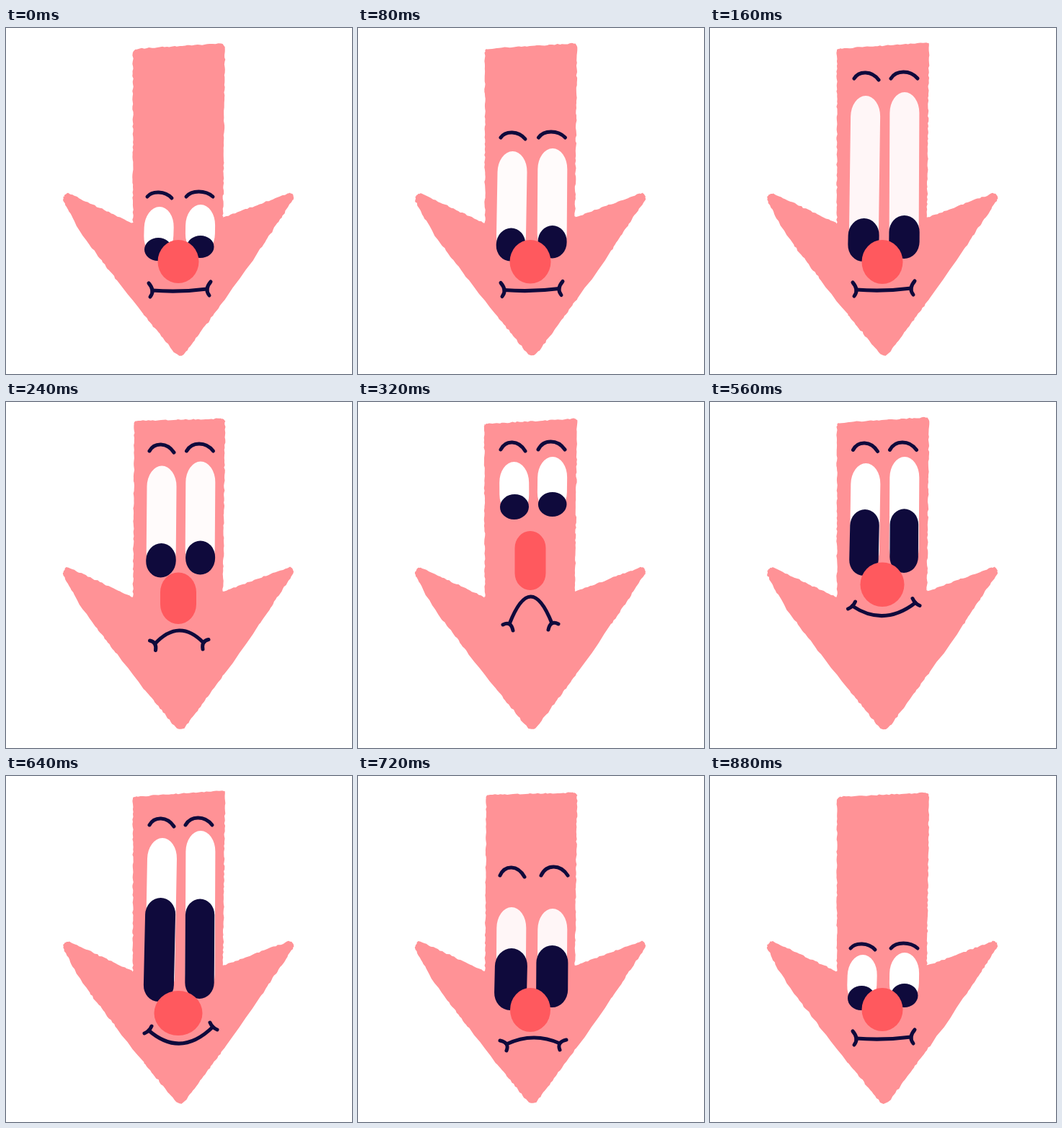
Animation of 480 by 480 pixels, one loop 960 ms. Source, as an HTML page with a canvas:

```html
<!DOCTYPE html>
<html lang="en">
<head>
<meta charset="utf-8">
<title>Arrow face</title>
<style>
  html, body { margin: 0; width: 100%; height: 100%; overflow: hidden; background: #fff; }
  canvas { display: block; width: 480px; height: 480px; }
</style>
</head>
<body>
<canvas id="stage" width="480" height="480"></canvas>
<script>
const ctx = document.getElementById('stage').getContext('2d');
const STEP = 80, STEPS = 12;
const PINK = '#ff9296', RED = '#ff595e', NAVY = '#0f0a3c';

// Both halves of a mouth-corner tick, relative to the left corner
const FLAT = [-5, -10, -3, 9], FROWN = [-9, 1, 5, 9], SMILE = [-6, 4, 4, -6], SAD = [-9, -5, 0, 9];

// brow: leftX, rightX, y, rise | eye: leftX, leftTop, rightTop, tint
// pupil: leftX, width, top, height, rightTop | nose: width, top, height
// mouth: leftX, leftY, middleY, rightX, rightY
const rest = {
  at: 0, brow: [196, 250, 235, 7], eye: [213, 248, 245, 0], pupil: [211, 38, 291, 32, 288],
  nose: [57, 294, 60], mouth: [203, 364, 365, 279, 362], tick: FLAT
};
const poses = [
  rest,
  { at: 2, brow: [200, 251, 71, 9], eye: [216, 94, 89, 9], pupil: [213, 43, 264, 60, 260],
    nose: [57, 294, 61], mouth: [203, 363, 364, 279, 361], tick: FLAT },
  { at: 4, brow: [198, 250, 67, 11], eye: [216.5, 83, 76, 0], pupil: [217, 40, 128, 35, 125],
    nose: [43, 179, 82], mouth: [210, 308, 270, 269, 307], tick: FROWN },
  { at: 6, brow: [198, 250, 66, 11], eye: [215.5, 84, 76, 0], pupil: [215, 39, 129, 40, 126],
    nose: [55, 147, 61], mouth: [197, 213, 222, 283, 209], tick: SMILE },
  { at: 8, brow: [199, 249, 69, 10], eye: [217, 86, 76, 0], pupil: [213, 42, 169, 144, 170.5],
    nose: [67, 298, 62], mouth: [198, 353, 371, 287, 348], tick: SMILE },
  { at: 9, brow: [197, 254, 139, 12], eye: [213, 182, 184, 9], pupil: [212, 45, 239, 86, 235],
    nose: [56, 294, 61], mouth: [206, 372, 363, 280, 371], tick: SAD },
  { ...rest, at: 11, brow: [195, 251, 240, 7], eye: [212, 248, 245, 0], pupil: [210, 38, 291, 34, 288] }
];

function poseAt(step) {
  const i = poses.findLastIndex(p => p.at <= step);
  const a = poses[i], b = poses[i + 1] || rest;
  const k = (step - a.at) / ((b.at || STEPS) - a.at);
  const mix = name => a[name].map((v, j) => v + (b[name][j] - v) * k);
  return Object.fromEntries(['brow', 'eye', 'pupil', 'nose', 'mouth', 'tick'].map(n => [n, mix(n)]));
}

function seeded(seed) {
  return () => {
    seed = (seed * 16807) % 2147483647;
    return seed / 2147483647 - 0.5;
  };
}

// Arrow outline with rounded corners and a hand-drawn, boiling edge
function drawArrow(boil) {
  const random = seeded(9173 + boil * 7919);
  const shift = [0, 0, 0, 2, -1, 0][boil];
  const topRight = [21, 21, 20, 23, 23, 23][boil];
  const cut = [9, 6, 4, 5, 4, 6][boil];
  const corners = [
    [176 + shift, 29 - shift * 1.3, cut], [304, topRight, cut], [301, 263, 1],
    [396, 228, 4], [400, 236, 4], [329, 342, 40], [242, 460, 14],
    [172, 374, 30], [104, 285, 20], [78, 237, 5], [84, 228, 5], [176, 271, 1]
  ];
  const toward = (p, q, d) => {
    const k = d / Math.hypot(q[0] - p[0], q[1] - p[1]);
    return [p[0] + (q[0] - p[0]) * k, p[1] + (q[1] - p[1]) * k];
  };
  const dot = (x, y) => ctx.lineTo(x + random() * 1.5, y + random() * 1.5);
  ctx.beginPath();
  corners.forEach((p, i) => {
    const n = corners.length, prev = corners[(i + n - 1) % n], next = corners[(i + 1) % n];
    const a = toward(p, prev, p[2]), b = toward(p, next, p[2]), c = toward(next, p, next[2]);
    for (let t = 0; t < 1; t += 0.2) {
      const u = 1 - t;
      dot(u * u * a[0] + 2 * u * t * p[0] + t * t * b[0], u * u * a[1] + 2 * u * t * p[1] + t * t * b[1]);
    }
    const length = Math.hypot(c[0] - b[0], c[1] - b[1]);
    for (let d = 0; d < length; d += 3.5) dot(...toward(b, c, d));
  });
  ctx.closePath();
  ctx.fillStyle = PINK;
  ctx.fill();
}

// Upright pill whose centre line may lean from topX to bottomX
function pill(topX, top, bottomX, bottom, width, color, roundness = 0.55) {
  const h = bottom - top;
  const radius = { x: width / 2, y: Math.min(h / 2, width * roundness) };
  ctx.save();
  ctx.transform(1, 0, (bottomX - topX) / h, 1, topX, top);
  ctx.beginPath();
  ctx.roundRect(-width / 2, 0, width, h, radius);
  ctx.fillStyle = color;
  ctx.fill();
  ctx.restore();
}

// Stroke that passes through the middle point
function arc(x1, y1, mx, my, x2, y2) {
  ctx.beginPath();
  ctx.moveTo(x1, y1);
  ctx.quadraticCurveTo(2 * mx - (x1 + x2) / 2, 2 * my - (y1 + y2) / 2, x2, y2);
  ctx.stroke();
}

// Full-shouldered arch
function arch(x, y1, y2, width, rise) {
  const top = (y1 + y2) / 2 - rise * 4 / 3;
  ctx.beginPath();
  ctx.moveTo(x, y1);
  ctx.bezierCurveTo(x + width * 0.2, top, x + width * 0.72, top, x + width, y2);
  ctx.stroke();
}

function drawFace({ brow, eye, pupil, nose, mouth, tick }) {
  const [leftBrow, rightBrow, browY, rise] = brow;
  const [eyeX, leftTop, rightTop, tint] = eye;
  const [pupilX, width, top, height, pupilRightTop] = pupil;
  const white = `rgb(255 ${255 - tint} ${255 - tint * 0.9})`;
  const bottom = top + height, lean = height / 90;

  pill(eyeX, leftTop, pupilX, bottom - 6, 41, white, 0.7);
  pill(270, rightTop, 269, bottom - 9, 41, white, 0.7);
  pill(pupilX + lean, top, pupilX - lean, bottom, width, NAVY);
  pill(270 - lean / 2, pupilRightTop, 270 - lean, bottom - 4, width - lean, NAVY);
  pill(239, nose[1], 239, nose[1] + nose[2], nose[0], RED);

  ctx.strokeStyle = NAVY;
  ctx.lineWidth = 5;
  ctx.lineCap = 'round';
  arch(leftBrow, browY - 1, browY + 1, 34, rise);
  arch(rightBrow, browY - 1, browY - 1, 37, rise);

  const [lx, ly, midY, rx, ry] = mouth;
  arc(lx, ly, (lx + rx) / 2, midY, rx, ry);
  const [ax, ay, bx, by] = tick;
  arc(lx + ax, ly + ay, lx, ly, lx + bx, ly + by);
  arc(rx - ax, ry + ay, rx, ry, rx - bx, ry + by);
}

function frame() {
  const step = Math.floor(performance.now() / STEP) % STEPS;
  ctx.fillStyle = '#fff';
  ctx.fillRect(0, 0, 480, 480);
  drawArrow(step % 6);
  drawFace(poseAt(step));
  requestAnimationFrame(frame);
}
frame();
</script>
</body>
</html>
```
